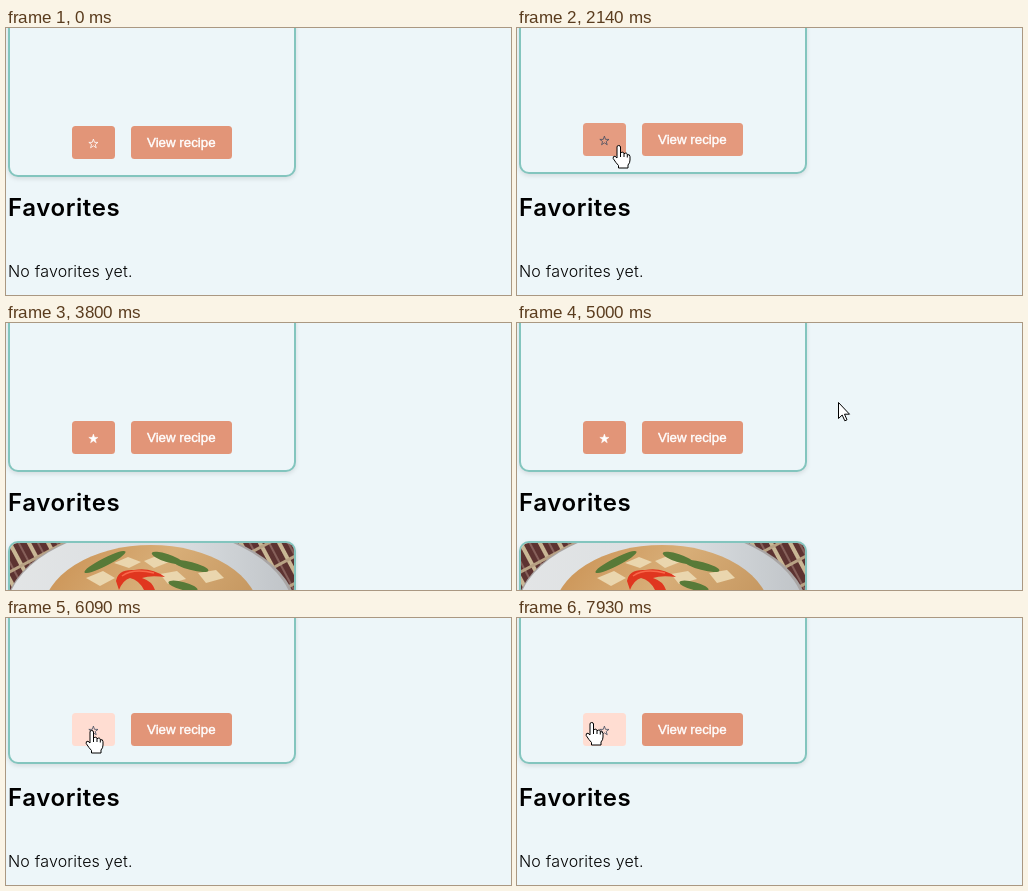
These frames come from a looping animation (505x267 px, 8 s). An HTML page:

```html
<!DOCTYPE html>
<html lang="en">
<head>
<meta charset="utf-8">
<title>Recipe favorites</title>
<style>
  html, body { margin: 0; width: 100%; height: 100%; overflow: hidden; background: #edf6f9; }
  svg { display: block; width: 100%; height: 100%; }
  .card { fill: #edf6f9; stroke: #83c5be; stroke-width: 2; filter: drop-shadow(0 2px 2px rgba(0, 0, 0, .1)); }
  .ui { font: 13.333px "Liberation Sans", Arial, sans-serif; }
  .copy { font: 350 16px Inter, sans-serif; letter-spacing: .19px; }
  .title { font: 600 24px Inter, sans-serif; letter-spacing: .6px; }
  .pointer { fill: #fff; stroke: #000; stroke-width: 1; stroke-linejoin: round; }
</style>
</head>
<body>
<svg viewBox="0 0 505 267" xmlns="http://www.w3.org/2000/svg">
  <defs>
    <clipPath id="photoClip"><rect x="4" y="220" width="284" height="90" rx="8"/></clipPath>
    <pattern id="mat" width="17" height="24" patternUnits="userSpaceOnUse" patternTransform="rotate(-28)">
      <rect width="17" height="24" fill="#5d3331"/>
      <rect width="4" height="24" fill="#c9b795"/>
      <rect x="9" width="2" height="24" fill="#86605a"/>
      <rect y="4" width="17" height="3" fill="#b8a284"/>
    </pattern>
    <linearGradient id="rim">
      <stop stop-color="#e3e5e6"/>
      <stop offset=".6" stop-color="#d9dde0"/>
      <stop offset="1" stop-color="#bfc3c7"/>
    </linearGradient>
    <linearGradient id="soup" x2="1" y2=".5">
      <stop stop-color="#c98f50"/>
      <stop offset=".5" stop-color="#d8ae78"/>
      <stop offset="1" stop-color="#c2935c"/>
    </linearGradient>
  </defs>

  <g id="recipe">
    <rect class="card" x="3" y="-60" width="286" height="208" rx="9"/>
    <rect id="starBg" x="66" y="98" width="43" height="33" rx="3.5"/>
    <path id="star" stroke-linejoin="miter"/>
    <rect id="viewBg" x="125" y="98" width="101" height="33" rx="3.5"/>
    <text id="viewText" class="ui" x="141" y="119" stroke-width=".4">View recipe</text>
  </g>

  <text class="title" x="2" y="188">Favorites</text>
  <text id="empty" class="copy" x="2" y="249">No favorites yet.</text>

  <g id="favorite">
    <rect class="card" x="3" y="219" width="286" height="90" rx="9"/>
    <g clip-path="url(#photoClip)">
      <rect x="4" y="220" width="284" height="50" fill="url(#mat)"/>
      <ellipse cx="145" cy="290" rx="146" ry="87" fill="#a9a5a4"/>
      <ellipse cx="144" cy="291" rx="144" ry="87" fill="url(#rim)"/>
      <ellipse cx="145" cy="290" rx="108" ry="68" fill="url(#soup)"/>
      <g fill="#ead6ae">
        <path d="M80 255l17-7 12 7-15 8zM108 240l14-6 13 5-12 6zM138 238l15-6 10 7-15 6zM192 250l18-3 8 8-18 5zM154 251l17-3 9 8-18 5z"/>
      </g>
      <g fill="#587a38">
        <ellipse cx="99" cy="239" rx="23" ry="4" transform="rotate(-27 99 239)"/>
        <ellipse cx="161" cy="235" rx="16" ry="4" transform="rotate(18 161 235)"/>
        <ellipse cx="185" cy="243" rx="18" ry="4" transform="rotate(15 185 243)"/>
        <ellipse cx="177" cy="263" rx="15" ry="4" transform="rotate(15 177 263)"/>
      </g>
      <path d="M110 258Q112 246 128 247Q145 244 159 254Q144 252 136 255Q146 258 149 267H138Q133 257 124 255Q117 257 113 267Z" fill="#e0361f"/>
      <path d="M116 253Q127 245 148 250" fill="none" stroke="#f9684a" stroke-width="1.5"/>
    </g>
  </g>

  <path id="arrow" class="pointer" d="M.5 .5V16.5L4.2 13L6.8 18.8L9 17.8L6.5 12.2H11.5Z"/>
  <path id="hand" class="pointer" d="M-2 13V2Q-2 .5 -.3 .5T1.5 2V8Q4.5 6 5 8.7Q8 7 8.3 9.7Q11 9 11 11.7V15Q11 18 9 20V23H-.5V20.5Q-3 18 -5.8 13.5Q-6.3 11 -4 11.2ZM1.5 8V12M5 8.7V12M8.3 9.7V12.5"/>
</svg>

<script>
  const LOOP = 8000, FADE = 300;
  const IDLE = [226, 149, 120], HOVER = [255, 221, 210], INK = '#454d60';

  // Alternating on/off times of each hover state.
  const hovers = {
    card: [1250, 3490, 5040, 6480, 7420],
    view: [1570, 1930, 5170, 5300, 7470, 7560],
    star: [2110, 3300, 5390, 6390, 7630]
  };
  const saved = [2970, 5980];

  // Pointer visits as [time, x, y] waypoints.
  const visits = [
    [[990, 489, 43], [1260, 284, 87], [1520, 196, 90], [1660, 172, 102], [1930, 124, 113],
     [2140, 102, 117], [2420, 85, 104], [2810, 85, 104], [2820, 78, 103], [3240, 78, 103], [3490, 153, 31]],
    [[4860, 440, 57], [5040, 288, 85], [5180, 208, 97], [5350, 116, 103], [5490, 97, 107],
     [5630, 89, 109], [5690, 88, 110], [5760, 86, 112], [6180, 86, 112], [6480, 114, 128]],
    [[7240, 445, 64], [7420, 284, 92], [7490, 200, 100], [7570, 120, 104], [7640, 102, 106],
     [7930, 75, 104], [8000, 75, 104]]
  ];

  const el = {};
  document.querySelectorAll('svg [id]').forEach(n => el[n.id] = n);

  const isOn = (times, t) => times.filter(x => x <= t).length % 2 === 1;
  const show = (node, on) => node.setAttribute('display', on ? 'inline' : 'none');

  // CSS "ease": cubic-bezier(.25, .1, .25, 1).
  function ease(x) {
    if (x <= 0 || x >= 1) return x <= 0 ? 0 : 1;
    let lo = 0, hi = 1, u = .5;
    for (let i = 0; i < 16; i++) {
      u = (lo + hi) / 2;
      if (.75 * u * (1 - u) + u ** 3 < x) lo = u; else hi = u;
    }
    return .3 * u * (1 - u) ** 2 + 3 * u * u * (1 - u) + u ** 3;
  }

  // Eased 0..1 level, continuing from wherever an interrupted fade stood.
  function level(times, t) {
    let v = 0;
    times.forEach((start, i) => {
      if (start > t) return;
      const end = Math.min(t, times[i + 1] ?? t);
      v += ((i + 1) % 2 - v) * ease((end - start) / FADE);
    });
    return v;
  }

  function pointerAt(t) {
    const path = visits.find(p => t >= p[0][0] && t < p[p.length - 1][0]);
    if (!path) return null;
    const i = path.findIndex(p => p[0] > t);
    const a = path[i - 1], b = path[i];
    const k = (t - a[0]) / (b[0] - a[0]);
    return [a[1] + (b[1] - a[1]) * k, a[2] + (b[2] - a[2]) * k];
  }

  const tint = k => `rgb(${IDLE.map((c, i) => Math.round(c + (HOVER[i] - c) * k))})`;

  function starPath(cx, cy, r) {
    const points = Array.from({ length: 10 }, (_, i) => {
      const a = i * Math.PI / 5 - Math.PI / 2, d = i % 2 ? r * .4 : r;
      return `${(cx + d * Math.cos(a)).toFixed(2)} ${(cy + d * Math.sin(a)).toFixed(2)}`;
    });
    return `M${points.join('L')}Z`;
  }
  el.star.setAttribute('d', starPath(87.4, 115.9, 4.8));

  function render(t) {
    const onStar = isOn(hovers.star, t), onView = isOn(hovers.view, t), isSaved = isOn(saved, t);
    const starInk = onStar ? INK : '#fff', viewInk = onView ? INK : '#fff';

    el.recipe.setAttribute('transform', `translate(0 ${-3 * level(hovers.card, t)})`);
    el.starBg.setAttribute('fill', tint(level(hovers.star, t)));
    el.viewBg.setAttribute('fill', tint(level(hovers.view, t)));
    el.star.setAttribute('stroke', starInk);
    el.star.setAttribute('stroke-width', isSaved ? .5 : .8);
    el.star.setAttribute('fill', isSaved ? starInk : 'none');
    el.viewText.setAttribute('fill', viewInk);
    el.viewText.setAttribute('stroke', viewInk);
    show(el.empty, !isSaved);
    show(el.favorite, isSaved);

    const pos = pointerAt(t), overButton = onStar || onView;
    show(el.arrow, pos && !overButton);
    show(el.hand, pos && overButton);
    if (pos) {
      const move = `translate(${pos.map(Math.round).join(' ')})`;
      el.arrow.setAttribute('transform', move);
      el.hand.setAttribute('transform', move);
    }
  }

  const began = performance.now();
  function tick() {
    render((performance.now() - began) % LOOP);
    requestAnimationFrame(tick);
  }
  tick();
</script>
</body>
</html>
```
